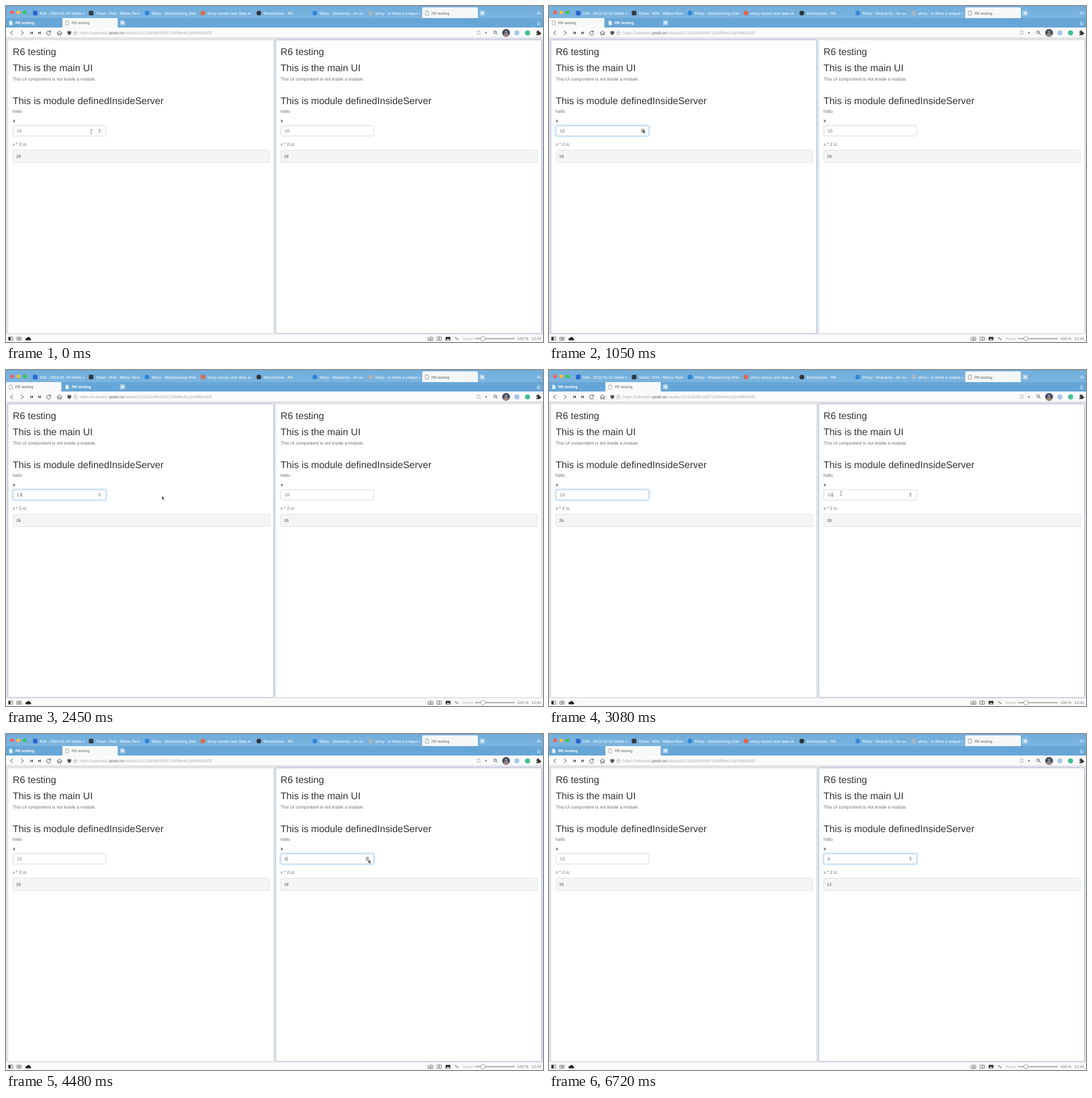
Write an HTML page that moves like this. It is 800 by 500 pixels and loops after 6.79 s.

```html
<!DOCTYPE html>
<html lang="en">
<head>
<meta charset="utf-8">
<title>R6 testing</title>
<style>
html, body { margin: 0; width: 100%; height: 100%; overflow: hidden; background: #fff; }
#stage { display: block; width: 800px; height: 500px; font: 6px "Liberation Sans", Arial, sans-serif; }
text { white-space: pre; text-rendering: geometricPrecision; }
.h { font-size: 14.4px; fill: #333; }
.p { font-size: 6.58px; fill: #6c6c6c; }
.tab { font-size: 5.9px; }
.mono { font: 5.9px "DejaVu Sans Mono", "Liberation Mono", monospace; fill: #4a4a4a; }
.line { fill: none; stroke: #555; stroke-width: .9; stroke-linecap: round; stroke-linejoin: round; }
</style>
</head>
<body>
<svg id="stage" viewBox="0 0 800 500">
  <defs>
    <linearGradient id="bar" x2="0" y2="1"><stop stop-color="#72aedb"/><stop offset="1" stop-color="#7ab4df"/></linearGradient>
    <filter id="blur" x="-10%" y="-60%" width="120%" height="220%"><feGaussianBlur stdDeviation="1.1"/></filter>
    <path id="page" d="M-2-3H1L2.3-1.5V3H-2ZM1-3V-1.5H2.3" stroke-width=".6"/>
    <g id="plus"><rect x="-3.8" y="-3.8" width="7.6" height="7.6" rx="1.5" fill="#a9cdea"/><path d="M-2.2 0H2.2M0-2.2V2.2" stroke="#fff"/></g>
  </defs>
  <rect width="800" height="500" fill="#e3e4e5"/>

  <rect width="800" height="18" fill="url(#bar)"/>
  <rect y="18" width="800" height="14.5" fill="#66a6d6"/>
  <g id="lights"></g>
  <g id="topTabs"></g>
  <path d="M620 18V4q0-2 2-2h79q2 0 2 2v14z" fill="#f4f6f7"/>
  <use href="#page" x="627" y="10.5" fill="#fff" stroke="#777"/>
  <text class="tab" x="634" y="13" fill="#666">R6 testing</text>
  <use href="#plus" x="709.5" y="10.5"/>
  <path d="M791 12.5h6a1.5 1.5 0 0 0-1-2.5 2 2 0 0 0-4 0 1.3 1.3 0 0 0-1 2.5z" fill="#a9cdea"/>
  <path d="M791.5 25h4v3h-4zm1 0v-1.5a1.2 1.2 0 0 1 2.2-.7" fill="none" stroke="#d5e7f4" stroke-width=".8"/>
  <g id="subTabs"></g>
  <use href="#plus" x="173.5" y="25"/>

  <rect y="32" width="800" height="15" fill="#fbfbfb"/>
  <path d="M0 47.2H800" stroke="#d4d5d6" stroke-width=".6"/>
  <g class="line">
    <path d="M10 37.2l-3.5 2.8 3.5 2.8M22.5 37.2l3.5 2.8-3.5 2.8"/>
    <path d="M66 38.5a3 3 0 1 0 .5 2.4M66.3 36.9v2h-2"/>
    <path d="M76 40l3.7-3.3 3.7 3.3M77.2 39.5v3.7h1.6v-2.2h1.8v2.2h1.6v-3.7" stroke-width=".8"/>
    <path d="M101.5 39.5h4.2v3.3h-4.2zM102.3 39.3v-1.2a1.3 1.3 0 0 1 2.6 0v1.2" stroke="#aaa" stroke-width=".7"/>
    <path d="M702.5 37.2h3.6v5.3l-1.8-1.5-1.8 1.5z" stroke="#999" stroke-width=".6"/>
    <circle cx="728.6" cy="39" r="2"/><path d="M730.2 40.7l2 2"/>
  </g>
  <path d="M40 37.9v4.2l-2.8-2.1zM36.2 37.9h.9v4.2h-.9zM48.2 37.9v4.2l2.8-2.1zM51.1 37.9h.9v4.2h-.9z" fill="#444"/>
  <path d="M91.5 37.4h5.6v2.8q-.5 1.9-2.8 3-2.3-1.1-2.8-3z" fill="#555"/>
  <path d="M713.3 39.2h3.4l-1.7 2z" fill="#444"/>
  <text x="110" y="42.2" font-size="6.18" fill="#ababab">https://colorado.<tspan fill="#555">posit.co</tspan>/rstudio/s/2115e58c508711f698e4c1/p/6960a93f</text>
  <circle cx="745" cy="40" r="5.8" fill="#39476a"/>
  <circle cx="745" cy="38.6" r="2.1" fill="#a08478"/>
  <path d="M741 43.8a4 3.6 0 0 1 8 0 5.8 5.8 0 0 1-8 0z" fill="#a08478"/>
  <circle cx="761" cy="40" r="3.8" fill="#a9c4ec"/>
  <circle cx="777" cy="40" r="3.8" fill="#3fbf93"/>
  <path d="M790 38h1.7a1.2 1.2 0 1 1 2 0h1.8v1.8a1.2 1.2 0 1 1 0 2v1.5h-5.5v-1.7a1.1 1.1 0 1 0 0-1.8z" fill="#333"/>

  <g id="panes"></g>

  <rect y="488.5" width="800" height="11.5" fill="#f9f9f9"/>
  <g class="line" stroke-width=".8">
    <path d="M4 492.7h6v4.6h-6zM16.5 492.9h6v4.4h-6zM642.5 492.8h6v4.5h-6zM645.5 492.8v4.5" stroke-width=".7"/>
    <circle cx="19.5" cy="495.1" r="1.1"/>
    <path d="M629.2 493.5h1.6l.8-1h2l.8 1h1.5v4h-6.7z" stroke-width=".7"/>
    <circle cx="632.5" cy="495.5" r="1"/>
    <path d="M669 494.3l1.2-1.2 1.2 1.2M670.2 493.2v2.3M671.8 496l1 1 1-1M672.8 494.3v2.5" stroke-width=".6"/>
  </g>
  <path d="M4 492.7h2.8v4.6H4zM30 497.6h6a1.5 1.5 0 0 0 0-3 2.4 2.4 0 0 0-4.6-.5 1.9 1.9 0 0 0-1.4 3.5z" fill="#222"/>
  <path d="M655 492.5h7v5h-7z" fill="#222"/>
  <path d="M656 496.8l1.6-2 1.3 1.2 1.1-1 1.2 1.8z" fill="#fff"/>
  <text x="680.5" y="497.3" font-size="5.8" fill="#b8b8b8">Reset</text>
  <path d="M698.5 495H758" stroke="#777" stroke-width="1.2"/>
  <circle cx="710.5" cy="495" r="3.3" fill="#fff" stroke="#888" stroke-width=".7"/>
  <text x="762" y="497.3" font-size="5.8" fill="#777">100 %</text>
  <text x="783" y="497.3" font-size="5.8" fill="#777">12:41</text>

  <g id="cursor">
    <path id="arrow" d="M0 0V5.6L1.3 4.4 2.3 6.6 3.3 6.2 2.3 4.1H4Z" fill="#222" stroke="#fff" stroke-width=".4"/>
    <path id="beam" d="M-1.3-3.4q1.3 0 1.3 1 0-1 1.3-1M0-2.4V2.4M-1.3 3.4q1.3 0 1.3-1 0 1 1.3 1" fill="none" stroke="#777" stroke-width=".7"/>
  </g>
</svg>
<script>
const LOOP = 6790;
const $ = id => document.getElementById(id);
const show = (el, on) => { el.style.display = on ? '' : 'none'; };

$('lights').innerHTML = ['#fc5d57', '#fdbb3a', '#34c648']
  .map((c, i) => `<circle cx="${9 + i * 9.4}" cy="9.5" r="2.7" fill="${c}"/>`).join('');

const topTabs = [
  ['Edit - 2023-01-24 Week n', '#2b63cf', 0],
  ['Ticket: TAM - Millow Penn', '#30363c', 0],
  ['Shiny - Modularizing Shin', '#2f86d8', 1],
  ['shiny sessio user data at', '#e0694f', 1],
  ['Introduction - R6', '#30353b', 1],
  ['Shiny - Reactivity - An ov', '#2f86d8', 1],
  ['shiny - Is there a unique s', '#a9b5bf', 1],
];
$('topTabs').innerHTML = topTabs.map(([label, color, round], i) => {
  const x = 43.5 + i * 83.3;
  const icon = round
    ? `<circle cx="${x}" cy="10.5" r="3.5" fill="${color}"/>`
    : `<rect x="${x - 3.3}" y="7.2" width="6.6" height="6.6" fill="${color}"/>`;
  return `${icon}<svg x="${x + 6.7}" y="4" width="66.5" height="13">
    <text class="tab" y="9" fill="#fff">${label}</text></svg>`;
}).join('');

$('subTabs').innerHTML = [0, 84].map((x, i) => `
  <rect id="tab${i}" x="${x}" y="18" width="82.5" height="14.5" fill="#f7f9fa"/>
  <use id="icon${i}" href="#page" x="${x + 7}" y="25.2"/>
  <text id="name${i}" class="tab" x="${x + 14}" y="27.3">R6 testing</text>`).join('');

const pane = (i, x) => `
  <rect id="frame${i}" x="${x - 7.2}" y="50.3" width="396" height="437" rx="1.5" fill="#fff"/>
  <text class="h" x="${x}" y="73">R6 testing</text>
  <text class="h" x="${x}" y="97.3">This is the main UI</text>
  <text class="p" x="${x}" y="111.2">This UI compontent is not inside a module.</text>
  <text class="h" x="${x}" y="145.6">This is module definedInsideServer</text>
  <text class="p" x="${x}" y="159.3">hello</text>
  <text class="p" x="${x}" y="173.4" font-weight="bold" style="fill:#444">x</text>
  <rect id="glow${i}" x="${x}" y="178" width="139" height="15.6" rx="2" fill="none" stroke="#b9dcf7" stroke-width="1.8" filter="url(#blur)"/>
  <rect id="box${i}" x="${x + .4}" y="178.2" width="138.4" height="15.2" rx="2" fill="#fff" stroke-width=".8"/>
  <text id="value${i}" class="p" x="${x + 6}" y="188.2"></text>
  <path id="caret${i}" d="M0 182.5V189.5" stroke="#666" stroke-width=".6"/>
  <g id="spin${i}" transform="translate(${x + 129.5} 185.8)">
    <rect id="press${i}" x="-3" y="-3.4" width="6" height="6.8" rx="1" fill="#d2d2d2"/>
    <path d="M-1.8-.8L0-2.7 1.8-.8zM-1.8 .8L0 2.7 1.8 .8z" fill="#808080"/>
  </g>
  <text class="p" x="${x}" y="207.5">x * 2 is:</text>
  <rect x="${x + .4}" y="214.6" width="382.4" height="18.2" rx="2" fill="#f5f5f5" stroke="#dedfdf" stroke-width=".8"/>
  <text id="out${i}" class="mono" x="${x + 5}" y="225.6"></text>`;
$('panes').innerHTML = pane(0, 10) + pane(1, 409);

// [time, value] steps for each input and for its result
const values = [
  [[0, 10], [800, 11], [870, 12], [920, 13], [970, 14], [1020, 15], [1330, 14], [1540, 13]],
  [[0, 10], [3850, 9], [4400, 8], [4760, 7], [5040, 6]],
];
const results = [
  [[0, 20], [1300, 30], [1820, 26]],
  [[0, 20], [4130, 18], [4690, 16], [5320, 12]],
];
// [time, x, y] of the pointer
const path = [
  [0, 127, 187], [200, 127, 187], [600, 140, 183.5], [1650, 140, 183.5],
  [2200, 232.3, 187.5], [2520, 232.3, 187.5], [2900, 435, 183.7], [3150, 435, 183.7],
  [3600, 540, 187], [4900, 540, 187], [5200, 541, 190.5], [6300, 541, 190.5],
];

const stepAt = (steps, t) => steps.filter(s => s[0] <= t).pop()[1];

function pointAt(t) {
  const n = path.findIndex(p => p[0] > t);
  if (n < 0) return path[path.length - 1].slice(1);
  const [t0, x0, y0] = path[n - 1], [t1, x1, y1] = path[n];
  const u = (t - t0) / (t1 - t0), e = u * u * (3 - 2 * u);
  return [x0 + (x1 - x0) * e, y0 + (y1 - y0) * e];
}

function draw(t) {
  const active = t >= 700 && t < 2940 ? 0 : 1;
  const focus = t < 700 ? -1 : t < 3130 ? 0 : 1;
  const caretOn = t > 1400 && t < 5000 && t % 1000 < 500;
  const [x, y] = pointAt(t);

  [0, 1].forEach(i => {
    const on = i === active, left = i ? 409 : 10;
    show($('tab' + i), on);
    $('icon' + i).setAttribute('stroke', on ? '#888' : '#cfe3f3');
    $('icon' + i).setAttribute('fill', on ? '#fff' : '#e6f1f9');
    $('name' + i).setAttribute('fill', on ? '#666' : '#fff');
    $('name' + i).setAttribute('font-weight', on ? 'normal' : 'bold');
    $('frame' + i).setAttribute('stroke', on ? '#b0b7e4' : '#dcdddd');

    const value = String(stepAt(values[i], t));
    $('value' + i).textContent = value;
    $('out' + i).textContent = stepAt(results[i], t);
    show($('glow' + i), focus === i);
    $('box' + i).setAttribute('stroke', focus === i ? '#a3cbee' : '#d4d4d4');

    const hover = t < 6300 && x > left && x < left + 139;
    show($('spin' + i), hover || (focus === i && on));
    show($('press' + i), hover && x > left + 126);
    show($('caret' + i), on && caretOn);
    $('caret' + i).setAttribute('transform', `translate(${left + 6.4 + value.length * 3.66})`);
  });

  const overText = [10, 409].some(l => x > l && x < l + 126);
  show($('cursor'), t < 6300);
  show($('beam'), overText);
  show($('arrow'), !overText);
  $('cursor').setAttribute('transform', `translate(${x} ${y})`);
}

const start = performance.now();
function tick() {
  draw((performance.now() - start) % LOOP);
  requestAnimationFrame(tick);
}
tick();
</script>
</body>
</html>
```
